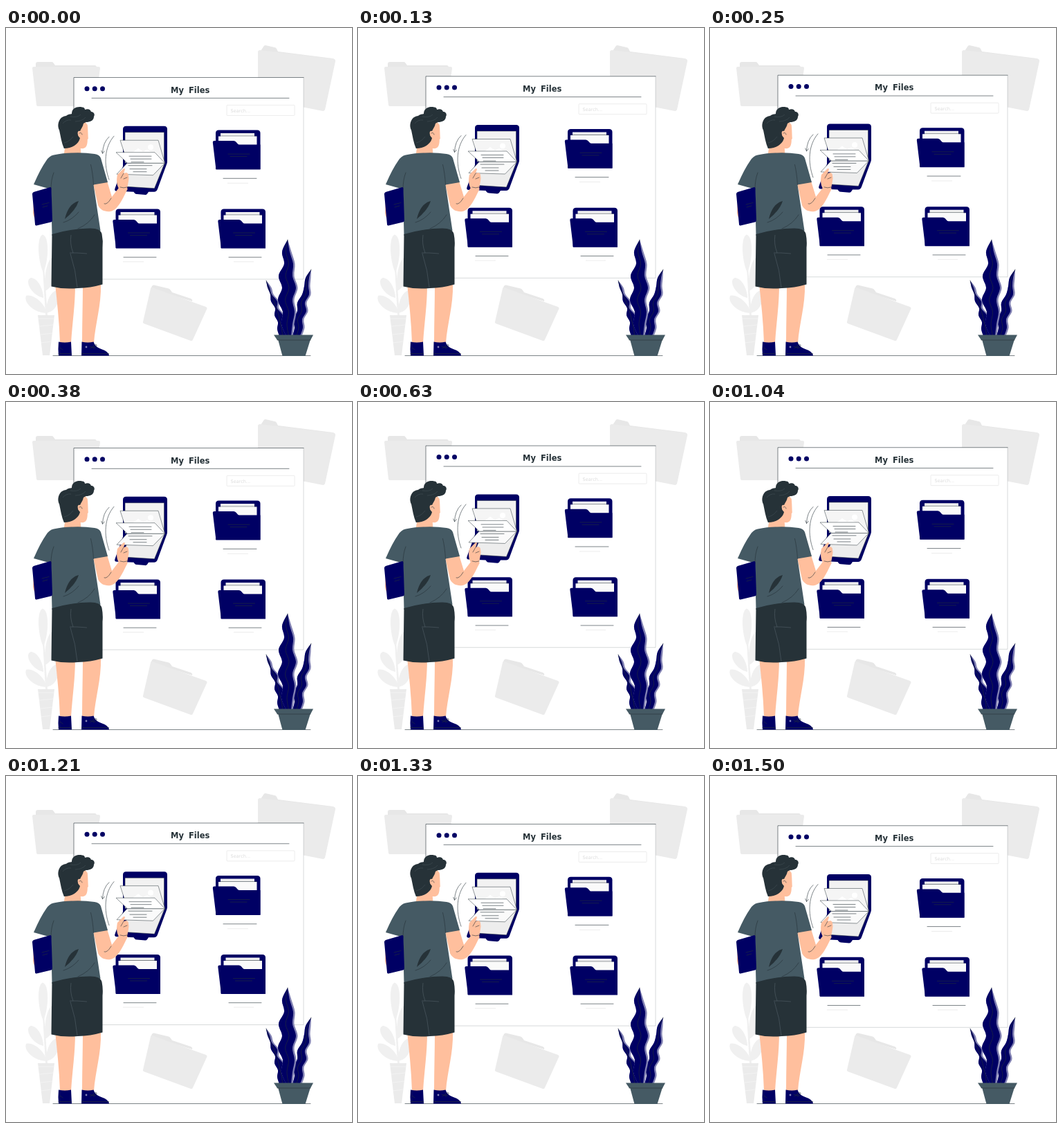
Animation, 500 px wide and 500 px high, one loop 1540 ms. Source, as an HTML page:

```html
<!DOCTYPE html>
<html lang="en">
<head>
<meta charset="utf-8">
<title>My Files</title>
<style>
  html, body { margin: 0; width: 100%; height: 100%; overflow: hidden; background: #fff; }
  svg { display: block; width: 100vw; height: 100vh; }
  text { font-family: "DejaVu Sans", sans-serif; }
  .navy { fill: #000064; }
  .dark { fill: #263238; }
  .slate { fill: #455a64; }
  .skin { fill: #ffbf9d; }
  .pale { fill: #ebebeb; }
  .tab { fill: #e7e7e7; }
  .plant { fill: #f0f0f0; }
  .line { fill: none; stroke: #263238; stroke-width: .6; stroke-linecap: round; stroke-linejoin: round; }
  .faint { fill: none; stroke: #e8e8e8; stroke-width: .8; }
  .page { stroke: #263238; stroke-width: .5; stroke-linejoin: round; }
</style>
</head>
<body>
<svg viewBox="0 0 500 500">
  <defs>
    <g id="folder">
      <path class="navy" d="M303 168V152q0-4.500 4.500-4.500H363q4.500 0 4.500 4.500V204H303z"/>
      <path fill="#f0f0f0" d="M310 152h49v6h-49z"/>
      <path class="line" d="M310 156h52"/>
      <path fill="#fafafa" d="M307 156.500h55.500V170H307z"/>
      <path class="navy" d="M301 163h28q2 0 3.300 1.500l2.400 2.700q1 1.200 2.600 1.200h30.200v36H303.500l-4.600-38.500q-.4-2.900 2.100-2.900z"/>
      <path class="line" d="M321 182h31M324 185.500h24"/>
    </g>
  </defs>

  <!-- background -->
  <path class="tab" d="M43 57v-5q0-3 3-3h20q2 0 3 2l2 3h57q3 0 3 3z"/>
  <path class="pale" d="M40 56h94q2 0 2 2l-7 55H46q-2 0-2-2l-6-53q0-2 2-2z"/>
  <path class="tab" d="M367 35l5-8q1-2 3-2l13 3q2 0 3 2l2 4 79 10q4 1 3 3z"/>
  <path class="pale" d="M367 32l107 13q2 0 2 3l-15 70q-1 2-3 2l-92-18q-2 0-2-3l0-64q0-3 3-3z"/>
  <path class="tab" d="M209 377l2-4q1-2 3-1.500l21 5q2 .5 3 2.500l2 3 27 9q3 1 2 4z"/>
  <path class="pale" d="M211 375l78 28q2 1 1.500 2.500l-20.500 45q-1 2-3 1.500l-68-25q-1.500-.6-1-2.500l11-48q.5-2 2-1.500z"/>
  <g class="plant">
    <path d="M53 298.500c-9 3-7 38 1 55 8-18 9-52-1-55zM36 361c-10 3 0 25 18 29 0-14-9-29-18-29zM29 387c-4 10 12 25 30 25-3-15-20-28-30-25z"/>
    <path d="M69 330c-11 5-14 31-13 50 13-5 18-25 17-48zM75 378c-13 4-17 20-17 34 12-2 19-12 19-32z"/>
    <path d="M53 345h2l5 70h-3z"/>
  </g>
  <path class="pale" d="M46 415h24l-7 58H53z"/>
  <path d="M47 420h22M48 431l20-2M50 443l17-2M51 455l14-2" stroke="#f5f5f5" stroke-width=".7"/>

  <g id="board">
    <path fill="#fff" d="M98 71.800h332v291.500H98z"/>
    <path class="line" d="M98 363V71.800h332"/>
    <path class="line" d="M430 72v291.300H98" stroke-opacity=".3"/>
    <g class="navy"><circle cx="117" cy="88" r="3.500"/><circle cx="128.200" cy="88" r="3.500"/><circle cx="139.500" cy="88" r="3.500"/></g>
    <text class="dark" y="93.900" font-size="11.500" font-weight="700"><tspan x="238">My</tspan><tspan x="264">Files</tspan></text>
    <path class="line" d="M124 101.600h285"/>
    <rect class="faint" x="319" y="111.700" width="98" height="15" rx="1"/>
    <text x="324.500" y="122.300" font-size="6.500" fill="#dcdcdc">Search...</text>

    <use href="#folder" y=".4"/>
    <use href="#folder" x="-144.500" y="114.300"/>
    <use href="#folder" x="7.500" y="114.300"/>
    <path class="line" d="M314 217.600h48M170 331.500h47M322 331.500h47"/>
    <path class="faint" d="M320 224.500h30M169 338h30M329 338h29"/>

    <!-- open folder with turning pages -->
    <path class="navy" d="M169 200V146.500q0-4.500 4.500-4.500H228.500q4.500 0 4.500 4.500V193q0 2-.8 4L219 233q-1.500 4-5 4H206l-2 3q-1 1.500-3 1.400l-12-1q-2-.2-3-1.400l-1.500-2L160 236q-4-.3-2.500-4z"/>
    <path class="page" fill="#f2f2f2" d="M172 151h56.500v44H172z"/>
    <path class="page" fill="#ededed" d="M229.500 195l-15 37-48-3 15-34z"/>
    <path class="page" fill="#f5f5f5" d="M165 162.500h55l9.500 32.500h-54z"/>
    <circle cx="209" cy="172.500" r="4" fill="#fff"/>
    <path fill="#fff" d="M182 181l9-7 7 5 6-3 8 5z"/>
    <path class="page" fill="#fafafa" d="M229.500 195.500l-17 17.500-52.500-1.500 15-16z"/>
    <path class="page" fill="#fff" d="M159 180h56l14.500 15.500h-54z"/>
    <path class="line" d="M178 185.500h32M180 189.500h30M181 194h18M177 199h34M179 204h24M184 208h19"/>
    <path class="line" d="M149 157.500q-9 8-9.500 24M137.800 177.500l1.700 4 3-3.300M156 156.500c-14 16-15 41-7 63"/>
  </g>

  <path class="line" d="M68 473.500h372"/>

  <!-- person -->
  <path class="skin" d="M71 370h29c0 30-4 55-6 85H78c-1-30-4-58-7-85zM111 370h26c1 30-8 57-10 85h-17c0-30 1-58 1-85z"/>
  <path class="navy" d="M76 453.500q9 2 18 0l1 20H76q-1-10 0-20zM109.500 453.500q9 2 17 0 2 7 10 10 12 4 12.500 10H109z"/>
  <path class="line" d="M76 470.500h18.500M109.500 470.500h39M78 462l4 3M121 460l7 3M122 463l5-4M127 459q4-3 4 0t-5 2"/>
  <circle cx="116" cy="461" r="1.400" fill="#8080b2"/>
  <path class="skin" d="M126 225l20-4 7 23 10-13 13 1c-7 14-14 31-25 33-8 1-15-2-18-9z"/>
  <path class="skin" d="M163 232c-4-7-3-15-2-20l8-8q2-2 3 0l-2 6 4-1q3 1 3 4 1 4 0 8l-2 11z"/>
  <path class="line" d="M166 217l4-7M170 218l5-2M165 230q5 2 10 0M142 254q4 2 10-8"/>
  <path class="skin" d="M40 247l-1 20q1 8 5 9z"/>
  <path class="skin" d="M87 160l21-25q10 0 10 8c.5 6 .5 12 .8 17l-1 1c0 9-2 14-10 13l.5 8q-11 7-24.500 0z"/>
  <path class="dark" d="M84 174.500c-4-9-5-18-7-27-4-8 0-20 10-20.500 3-3 6-2 8-3 0-9 9-11 15-9.500 3 0 4 2 4 3.500 5-2 8 0 9 3 4 0 6 4 4 7 0 6-6 8-11 8-2 1-3 1-4 2-1 5-4 8-5 11-4-2-5 5 0 10-2 9-12 15-23 15z"/>
  <circle class="skin" cx="108" cy="153.500" r="3.900"/>
  <path class="line" d="M106 152q3-2 4 2"/>
  <path fill="none" stroke="#46545b" stroke-width=".5" d="M93 128q10 2 15-3M100 135q10 0 15-6M82 138q5-6 12-5M84 166q8-2 13-9"/>
  <path class="slate" d="M69 183.500q14-3 25-3 18-1 34 1.500 7 1 9 6l10 35-20.500 3.500L136.500 293q-35 3-70 7L65 233l-25-7q10-23 18-34 4-7 11-8.500z"/>
  <path class="line" d="M126.500 226.500q-1-17-4-29M65 233q0-14 4-24M128 270q-8 13-24 20M83 281q13-4 22-15"/>
  <path class="dark" d="M85 276q5-22 20-26-4 13-20 26z"/>
  <path class="navy" d="M40 237l24-7q1.500 0 1.500 2L67 278q0 2-2 2.500l-21 5q-2 .5-2-2L38 240q0-2 2-3z"/>
  <path class="line" d="M52 255l10-2.500M53 259l7-2"/>
  <path class="dark" d="M66.500 298q26-8 54-8.500 16-.5 18 8 2 10 1 20v53q-17 5-36 5.500-20 2-38-2.500z"/>
  <path fill="none" stroke="#526068" stroke-width=".6" d="M94 299q-2 13 3 26M92 325h11l14 1M93 326q8 24 10 49"/>

  <!-- potted plant -->
  <g id="leaves"></g>
  <path class="slate" d="M393 450h47l-7.500 24h-33z"/>
  <path class="slate" d="M387 443.500h57l-4 7.500h-48z"/>
  <path class="line" d="M392 451h48"/>
</svg>
<script>
  const LOOP = 1540, LEAD = 20, PERIOD = 1520, RISE = 10;
  const board = document.getElementById('board');

  // Smooth curve through all points.
  function smooth(points) {
    let d = `M${points[0]}`;
    for (let i = 0; i < points.length - 1; i++) {
      const a = points[i], b = points[i + 1];
      const before = points[i - 1] || a, after = points[i + 2] || b;
      const c1 = a.map((v, k) => v + (b[k] - before[k]) / 6);
      const c2 = b.map((v, k) => v - (after[k] - a[k]) / 6);
      d += `C${c1} ${c2} ${b}`;
    }
    return d;
  }

  // Wavy leaf: edge positions at even heights from the tip down to the pot.
  function leaf(tipX, tipY, left, right) {
    const step = (445 - tipY) / left.length;
    const edge = (xs, shift) => xs.map((x, i) => [x + shift, tipY + step * (i + 1)]);
    const tip = [tipX, tipY];
    const outline = shift =>
      smooth([tip, ...edge(left, 0)]) + smooth([tip, ...edge(right, shift)].reverse()).replace('M', 'L') + 'z';
    const vein = smooth([tip, ...edge(left.map((x, i) => (x + right[i]) / 2), -1)]);
    return `<path d="${outline(.5)}" fill="#8080b2"/>
      <path d="${outline(-2)}" class="navy"/><path d="${vein}" class="line"/>`;
  }

  document.getElementById('leaves').innerHTML =
    leaf(376, 365, [378, 382, 383, 389, 388, 393, 392, 395], [383, 386, 394, 394, 402, 401, 407, 406]) +
    leaf(441, 349, [433, 431, 428, 421, 421, 415, 417, 414], [440, 439, 440, 434, 436, 430, 431, 427]) +
    leaf(407, 306, [399, 402, 394, 399, 393, 400, 398, 405], [412, 417, 416, 421, 416, 419, 416, 414]);

  function draw(now) {
    const phase = (now % LOOP + LEAD) / PERIOD % 1;
    const lift = RISE * (1 - Math.abs(1 - 2 * phase));
    board.setAttribute('transform', `translate(0 ${-lift})`);
    requestAnimationFrame(() => draw(performance.now()));
  }
  draw(0);
</script>
</body>
</html>
```
